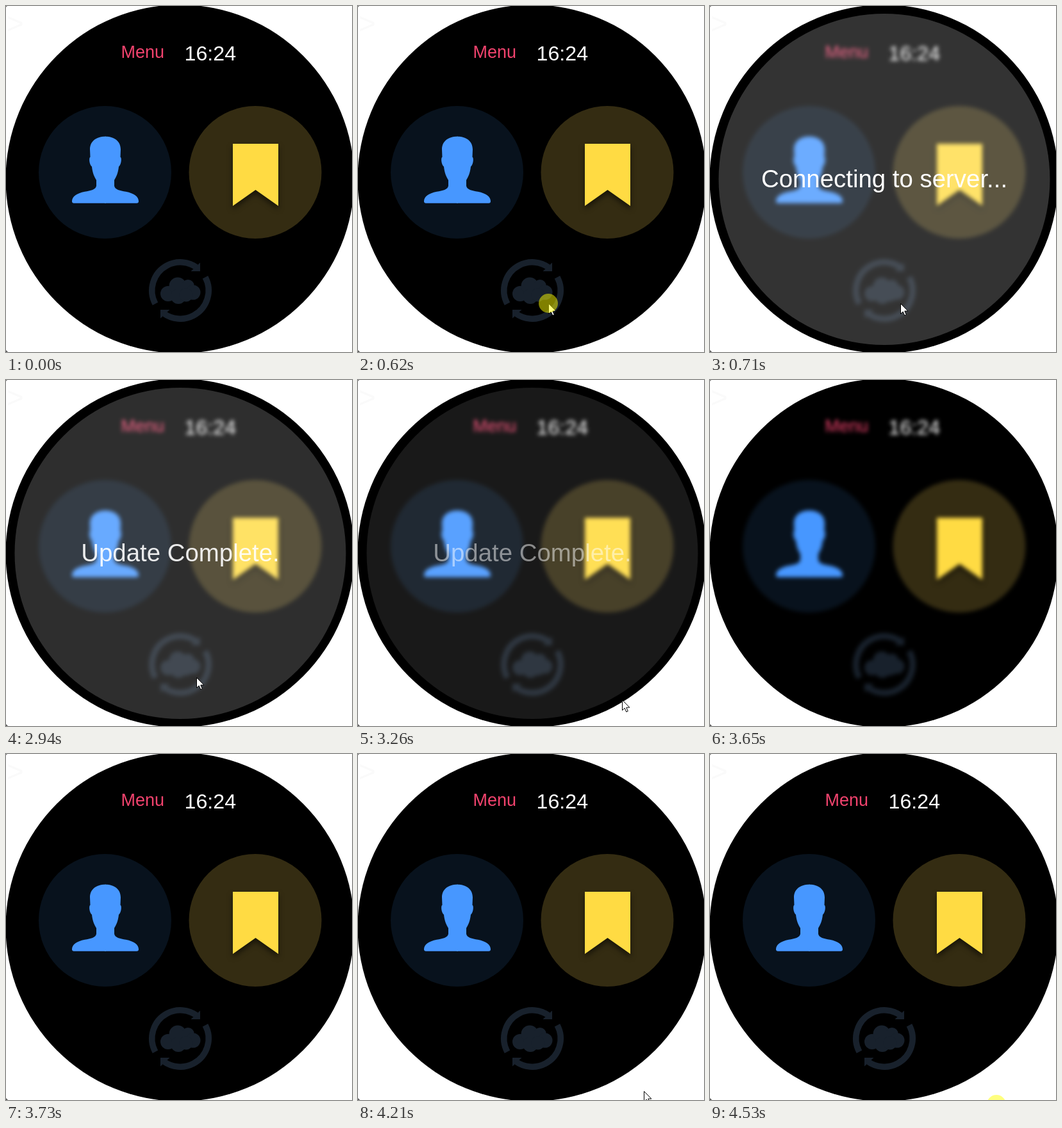
An HTML page with a canvas for the animation above (4610 ms loop, 540 by 540 pixels).

```html
<!DOCTYPE html>
<html lang="en">
<head>
<meta charset="utf-8">
<title>Watch menu</title>
<style>
html, body { margin: 0; width: 100%; height: 100%; overflow: hidden; background: #fff; }
canvas { display: block; }
</style>
</head>
<body>
<canvas id="stage" width="540" height="540"></canvas>
<script>
const SIZE = 540, LOOP = 4610;
const FONT = '"Liberation Sans", Arial, sans-serif';
const POPUP = { open: 710, done: 2940, close: 3730, x: 272, y: 270.5, r: 258.5 };
const ctx = document.getElementById('stage').getContext('2d');

// Pointer strokes: the pointer rests at its goal until "hide"
const MOVES = [
  { start: 220, end: 540, hide: 2940, from: [438, 526], to: [297, 464] },
  { start: 2940, end: 3340, hide: 3410, from: [297, 464], to: [440, 507] },
  { start: 3890, end: 3970, hide: 4130, from: [505, 516], to: [434, 532] },
  { start: 4130, end: 4530, hide: LOOP, from: [446, 521], to: [447, 547] }
];

function within(t, from, to) {
  return t >= from && t < to;
}

function circle(c, x, y, r) {
  c.beginPath();
  c.arc(x, y, r, 0, Math.PI * 2);
}

function disc(c, x, y, r, color) {
  c.fillStyle = color;
  circle(c, x, y, r);
  c.fill();
}

function poly(c, points, color) {
  c.fillStyle = color;
  c.beginPath();
  points.forEach(([x, y]) => c.lineTo(x, y));
  c.closePath();
  c.fill();
}

function label(c, text, x, y, size, color) {
  c.font = `${size}px ${FONT}`;
  c.fillStyle = color;
  c.fillText(text, x, y);
}

function makeLayer() {
  const canvas = document.createElement('canvas');
  canvas.width = canvas.height = SIZE;
  return canvas.getContext('2d');
}

// One half of the bust, mirrored; the halves overlap on the axis
function drawPerson(c) {
  const half = new Path2D(`M-1 0 L0 0 C15 0 24 8 24 20 L23.5 32
    C26 33 25 44 21 47 C20 57 17 63 14 68 L14 77
    C15 83 23 84.5 32 86 C45 88.5 52 94 52 101 Q52 104 49 104 L-1 104 Z`);
  c.save();
  c.translate(155, 203.8);
  c.fillStyle = '#4797ff';
  for (const side of [1, -1]) {
    c.scale(side, 1);
    c.fill(half);
  }
  c.restore();
}

function drawBookmark(c) {
  c.save();
  c.shadowColor = 'rgba(0,0,0,.55)';
  c.shadowBlur = 9;
  c.shadowOffsetY = 5;
  poly(c, [[354, 215], [425, 215], [425, 312], [389.5, 287], [354, 312]], '#ffdb43');
  c.restore();
}

function drawSync(c) {
  const color = '#18212c', deg = Math.PI / 180;
  c.save();
  c.translate(272, 444);
  c.strokeStyle = color;
  c.lineWidth = 9.5;
  for (let i = 0; i < 2; i++) {
    c.beginPath();
    c.arc(0, 0, 44.2, 152 * deg, 307 * deg);
    c.stroke();
    poly(c, [[31, -43.5], [31, -30], [16.5, -30]], color);
    c.rotate(Math.PI);
  }
  for (const [x, y, r] of [[-19, 5, 12], [-4, -7, 13.5], [12, -7, 10], [20, 3, 11.5], [-3, 9, 12], [9, 7, 10.5]])
    disc(c, x, y, r, color);
  c.restore();
}

function makeScene() {
  const c = makeLayer();
  c.fillStyle = '#fff';
  c.fillRect(0, 0, SIZE, SIZE);
  label(c, '>', 1, 43, 46, '#fafafa');
  poly(c, [[0, 0], [2, 0], [0, 2]], '#777');
  poly(c, [[0, 537], [3, 540], [0, 540]], '#555');
  disc(c, 271.5, 270, 272, '#000');
  label(c, 'Menu', 179.5, 81, 27, '#f2436e');
  label(c, '16:24', 278.5, 85, 32.2, '#fff');
  disc(c, 154.5, 259.5, 103.5, '#08121d');
  disc(c, 389, 259.5, 103.5, '#342c12');
  drawPerson(c);
  drawBookmark(c);
  drawSync(c);
  return c.canvas;
}

function makeBlurred(scene) {
  const c = makeLayer();
  circle(c, POPUP.x, POPUP.y, POPUP.r);
  c.clip();
  c.filter = 'blur(3.2px)';
  c.drawImage(scene, 0, 0);
  return c.canvas;
}

const scene = makeScene();
const blurred = makeBlurred(scene);

function drawPopup(t) {
  if (!within(t, POPUP.open, POPUP.close)) return;
  const done = t >= POPUP.done;
  ctx.drawImage(blurred, 0, 0);
  ctx.save();
  ctx.globalAlpha = done ? Math.max(0, 0.9 - (t - POPUP.done) / 790) : 1;
  disc(ctx, POPUP.x, POPUP.y, POPUP.r, 'rgba(255,255,255,.2)');
  ctx.textAlign = 'center';
  label(ctx, done ? 'Update Complete.' : 'Connecting to server...', POPUP.x, 283, 38.4, '#fff');
  ctx.restore();
}

function drawPointer(t) {
  const move = MOVES.find(m => within(t, m.start, m.hide));
  if (!move) return;
  const p = Math.min(1, (t - move.start) / (move.end - move.start));
  const [x, y] = move.from.map((v, i) => Math.round(v + (move.to[i] - v) * p));
  ctx.save();
  ctx.translate(x + 0.5, y + 0.5);
  poly(ctx, [[0, 0], [0, 16], [3.7, 12.6], [6.3, 18.5], [8.8, 17.4], [6.3, 11.6], [11.4, 11.6]], '#fff');
  ctx.strokeStyle = '#000';
  ctx.lineWidth = 1;
  ctx.stroke();
  ctx.restore();
  const pressed = within(t, 620, POPUP.open) || t >= 4530;
  if (pressed) disc(ctx, x, y, 15, 'rgba(255,255,0,.5)');
}

function frame() {
  const t = performance.now() % LOOP;
  ctx.drawImage(scene, 0, 0);
  drawPopup(t);
  drawPointer(t);
  requestAnimationFrame(frame);
}
frame();
</script>
</body>
</html>
```
